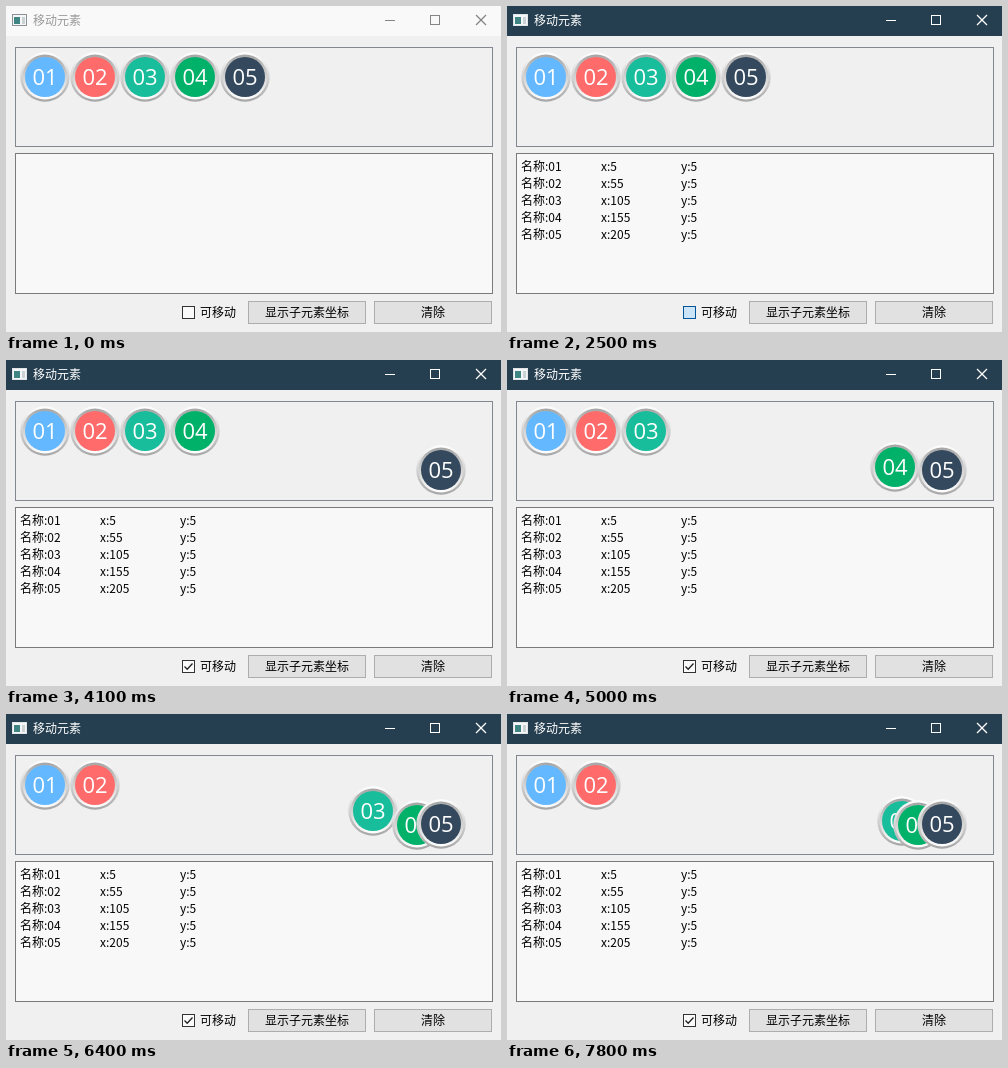
Write an HTML page with a canvas that moves like this. It is 495 px wide and 326 px high and loops after 8 s.

```html
<!DOCTYPE html>
<html lang="zh-CN">
<head>
<meta charset="utf-8">
<title>移动元素</title>
<style>
html, body { margin: 0; width: 100%; height: 100%; overflow: hidden; background: #f0f0f0; }
canvas { display: block; }
</style>
</head>
<body>
<canvas id="stage" width="495" height="326"></canvas>
<script>
const ctx = document.getElementById('stage').getContext('2d');
const LOOP = 8000, STEP = 100;
const UI = '12px "Noto Sans CJK SC", "Noto Sans CJK", sans-serif';
const DIGITS = '22px "Open Sans", "Noto Sans", sans-serif';

const GREY = [225, 225, 225], LIGHT = [229, 241, 251], PRESSED = [204, 228, 247];
const EDGE = [173, 173, 173], DARK = [51, 51, 51], BLUE = [0, 120, 215], NAVY = [0, 84, 153];
const PAPER = [250, 250, 250];

const colors = ['#64b8ff', '#ff6b6b', '#18bd9b', '#00b16a', '#34495e'];

// Drags by ball index: start time, end time, new x, new y, upward bow of the path
const drags = {
  2: [
    [5900, 6000, 170, 72], [6000, 6400, 367, 97], [6500, 7000, 144, 93, 30],
    [7000, 7400, 362, 105, -15], [7400, 7600, 383, 107], [7700, 7800, 395, 107]],
  3: [[4600, 5000, 388, 107], [5000, 5200, 411, 111]],
  4: [[3500, 3600, 264, 84], [3600, 4000, 435, 110]]
};

const ramp = (t, a, b) => Math.min(1, Math.max(0, (t - a) / (b - a)));
const pulse = (t, a, b, c, d) => ramp(t, a, b) - ramp(t, c, d);
const mix = (a, b, u) => a + (b - a) * u;
const blend = (a, b, u) => a.map((v, i) => mix(v, b[i], u));
const rgb = c => `rgb(${c.map(Math.round)})`;

function place(i, t) {
  let x = 39 + i * 50, y = 71;
  for (const [from, to, nx, ny, bow = 0] of drags[i] || []) {
    const u = ramp(t, from, to), ease = Math.sin(u * Math.PI / 2) ** 2;
    x = mix(x, nx, ease);
    y = mix(y, ny, ease) - bow * Math.sin(u * Math.PI);
  }
  return [Math.round(x), Math.round(y)];
}

function rect(x, y, w, h, color) {
  ctx.fillStyle = color;
  ctx.fillRect(x, y, w, h);
}

function frame(x, y, w, h, edge, fill) {
  rect(x, y, w, h, edge);
  rect(x + 1, y + 1, w - 2, h - 2, fill);
}

function text(str, x, y, color = '#000', align = 'left', font = UI) {
  ctx.font = font;
  ctx.fillStyle = color;
  ctx.textAlign = align;
  ctx.fillText(str, x, y);
}

function line(points, color, width = 1) {
  ctx.strokeStyle = color;
  ctx.lineWidth = width;
  ctx.beginPath();
  points.forEach(p => ctx.lineTo(...p));
  ctx.stroke();
}

function disc(x, y, r, fill) {
  ctx.fillStyle = fill;
  ctx.beginPath();
  ctx.arc(x, y, r, 0, Math.PI * 2);
  ctx.fill();
}

function bevel(x, y, r, top, bottom) {
  const g = ctx.createLinearGradient(0, y - r, 0, y + r);
  g.addColorStop(0, top);
  g.addColorStop(1, bottom);
  disc(x, y, r, g);
}

function ball(color, i, t) {
  const [x, y] = place(i, t);
  bevel(x, y, 24.75, '#fff', '#a6a6a6');
  bevel(x, y, 22.5, '#a6a6a6', '#fff');
  disc(x, y, 20, color);
  text('0' + (i + 1), x, y + 8, '#fff', 'center', DIGITS);
}

function titleBar(active) {
  const ink = active ? '#fff' : '#999';
  rect(0, 0, 495, 30, active ? '#253f50' : '#f9f9f9');
  frame(6, 8, 15, 12, active ? '#dfe5e8' : '#8a9298', '#f4f6f7');
  rect(8, 11, 6, 7, '#3f8583');
  rect(16, 11, 3, 7, '#cbd2d6');
  text('移动元素', 27, 19, ink);
  const mark = active ? '#fff' : '#858585';
  line([[379, 14.5], [389, 14.5]], mark);
  ctx.strokeRect(424.5, 9.5, 9, 9);
  line([[470, 9], [480, 19]], mark, 1.3);
  line([[480, 9], [470, 19]], mark, 1.3);
}

function button(label, x, hover, press) {
  const edge = blend(blend(EDGE, BLUE, hover), NAVY, press);
  const fill = blend(blend(GREY, LIGHT, hover), PRESSED, press);
  frame(x, 295, 118, 23, rgb(edge), rgb(fill));
  text(label, x + 59, 311, '#000', 'center');
}

function checkBox(t) {
  const hover = pulse(t, 2000, 2200, 2700, 2900);
  const press = pulse(t, 2400, 2500, 2500, 2600);
  const edge = blend(blend(DARK, BLUE, hover), NAVY, press);
  frame(176, 300, 13, 13, rgb(edge), rgb(blend(PAPER, PRESSED, press)));
  if (t >= 2600) line([[178.5, 306.5], [181.2, 309.3], [186.5, 303.5]], '#222', 1.3);
  text('可移动', 194, 311);
}

function draw(t) {
  rect(0, 0, 495, 326, '#f0f0f0');
  titleBar(t >= 400);
  frame(9, 41, 478, 100, '#828790', '#f0f0f0');
  frame(9, 147, 478, 141, '#7a7a7a', '#f8f8f8');

  if (t >= 1600) {
    for (let i = 0; i < 5; i++) {
      const y = 165 + i * 17;
      text('名称:0' + (i + 1), 14, y);
      text('x:' + (5 + i * 50), 94, y);
      text('y:5', 174, y);
    }
  }

  checkBox(t);
  button('显示子元素坐标', 242, pulse(t, 1000, 1300, 2000, 2200), 0.8 * pulse(t, 1300, 1500, 1500, 1700));
  button('清除', 368, 0, 0);
  colors.forEach((color, i) => ball(color, i, t));
}

const start = performance.now();
function tick() {
  const t = (performance.now() - start) % LOOP;
  draw(Math.floor(t / STEP) * STEP);
  requestAnimationFrame(tick);
}
tick();
</script>
</body>
</html>
```
